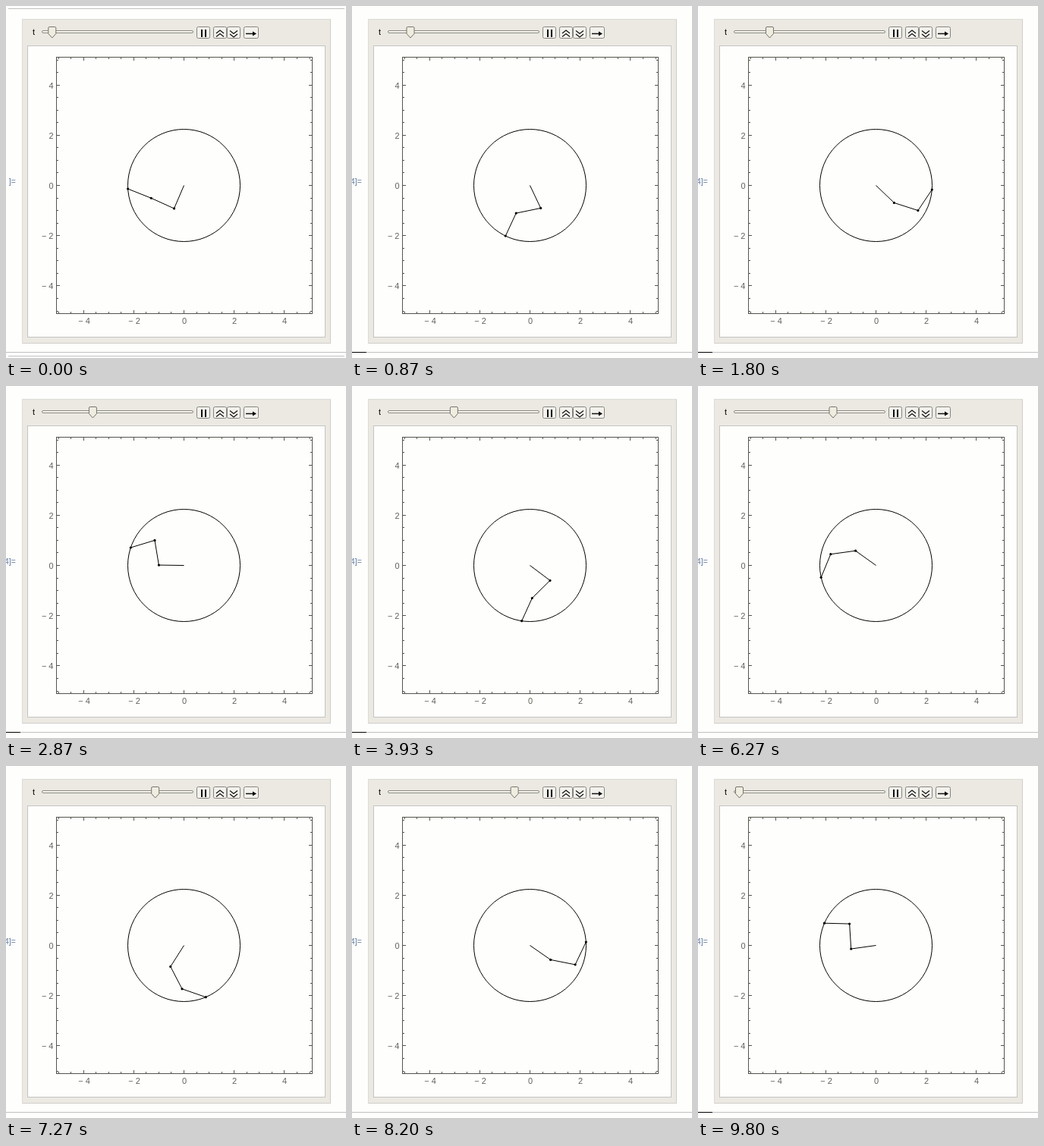
An HTML page that plays this animation: 448x464 px, repeating every 9870 ms.

```html
<!DOCTYPE html>
<html lang="en">
<head>
<meta charset="utf-8">
<title>Three-link arm on a circle</title>
<style>
html, body { margin: 0; width: 100%; height: 100%; overflow: hidden; background: #fefefc; }
svg { display: block; width: 448px; height: 464px; }
text { font: 11px "Liberation Sans", Arial, sans-serif; fill: #62625a; }
.line { fill: none; stroke: #000; stroke-width: 1; }
.axis { fill: none; stroke: #55554e; }
.rule { fill: none; stroke: #c0c0c0; }
.button { fill: #f3f1ec; stroke: #858580; }
.icon { fill: none; stroke: #111; stroke-width: 1.3; }
</style>
</head>
<body>
<svg viewBox="0 0 448 464">
  <path id="edges" class="rule" d="M3 3.5H446M3 461.5H446"/>
  <path class="rule" d="M0 456.5H448"/>
  <path id="caret" d="M0 456.5H19" stroke="#000"/>
  <text id="label" x="-2" y="235" style="font-size:10.5px;fill:#6079a0">4]=</text>

  <rect x="21.5" y="17.5" width="406" height="427" fill="#ece9e3" stroke="#dddbd6"/>
  <path d="M22 444.5H427.5V18" fill="none" stroke="#d0cecb"/>
  <rect x="28.5" y="52.5" width="392" height="384" fill="#fefefc" stroke="#c4c4c2"/>

  <text x="35" y="38" style="fill:#000">t</text>
  <rect x="47.5" y="32.5" width="199" height="3" rx="1.5" fill="#f4f2ea" stroke="#8a8a84"/>
  <path id="thumb" d="M-5 -5.5Q-5 -7-3.5 -7H3.5Q5 -7 5 -5.5V2L0 7.5L-5 2Z" fill="#efece0" stroke="#74746c"/>
  <g class="button">
    <rect x="251.5" y="27.5" width="17" height="15" rx="2"/>
    <rect x="273.5" y="27.5" width="17" height="15" rx="2"/>
    <rect x="291.5" y="27.5" width="17" height="15" rx="2"/>
    <rect x="313.5" y="27.5" width="19" height="15" rx="2"/>
  </g>
  <path class="icon" d="M277 36l5-4 5 4M277 40.5l5-4 5 4M295 32.5l5 4 5-4M295 37l5 4 5-4M316 36.5H328"/>
  <path d="M258 31V41M263 31V41" stroke="#111" stroke-width="2"/>
  <path d="M325 33.5L330 36.5L325 39.5Z"/>

  <rect class="axis" x="66.5" y="67.5" width="337" height="338"/>
  <path id="ticks" class="axis"/>
  <g id="numbers"></g>
  <circle class="line" cx="234.5" cy="236.5" r="74"/>
  <path id="arm" class="line" stroke-linejoin="round"/>
  <g id="joints"><circle r="1.6"/><circle r="1.6"/><circle r="1.6"/></g>
</svg>
<script>
const $ = id => document.getElementById(id);
const LOOP = 9870, TICK = 1000 / 15, UNIT = 33.1, CX = 234.5, CY = 236.5;
const RADIUS = Math.sqrt(5), REACH = 63.435, RAD = Math.PI / 180;

// [ms, angle of the tip, fold phase of the arm], in degrees
const keys = [
  [-370, 156.7, 60.5], [0, 183.5, 1.8], [1800, 355.7, 128.5], [2070, 407, 122],
  [3930, 621.3, 14.2], [5070, 698.8, 40], [6270, 912.8, 139.3],
  [8200, 1083.5, 127.2], [9800, 1236.7, 60.5], [10170, 1263.5, 1.8]
];

function slope(i, c) {
  const a = keys[i - 1], b = keys[i], d = keys[i + 1];
  const h = b[0] - a[0], k = d[0] - b[0];
  return ((b[c] - a[c]) / h * k + (d[c] - b[c]) / k * h) / (h + k);
}

// Hermite curve through the keys
function curve(t, c) {
  let i = 1;
  while (i < keys.length - 3 && t >= keys[i + 1][0]) i++;
  const a = keys[i], b = keys[i + 1], h = b[0] - a[0], s = (t - a[0]) / h, r = 1 - s;
  return a[c] * (1 + 2 * s) * r * r + b[c] * (3 - 2 * s) * s * s
    + h * s * r * (slope(i, c) * r - slope(i + 1, c) * s);
}

function armPoints(t) {
  const tip = curve(t, 1) * RAD, fold = curve(t, 2) * RAD;
  const first = tip + REACH * RAD * Math.cos(fold);
  const a = [Math.cos(first), Math.sin(first)];
  const e = [RADIUS * Math.cos(tip), RADIUS * Math.sin(tip)];
  const dx = e[0] - a[0], dy = e[1] - a[1], d2 = dx * dx + dy * dy;
  const bend = Math.sign(Math.sin(fold)) * Math.sqrt(Math.max(0, 1 / d2 - 0.25));
  const m = [a[0] + dx / 2 + dy * bend, a[1] + dy / 2 - dx * bend];
  return [a, m, e].map(([x, y]) => [CX + UNIT * x, CY - UNIT * y]);
}

function drawAxes() {
  let d = "", numbers = "";
  for (let i = -10; i <= 10; i++) {
    const x = Math.round(235 + i * UNIT / 2) - 0.5, y = Math.round(237 - i * UNIT / 2) - 0.5;
    const size = i % 4 ? 3 : 5;
    d += `M${x} 67v${size}M${x} 406v${-size}M66 ${y}h${size}M404 ${y}h${-size}`;
    if (i % 4 === 0) {
      const n = i < 0 ? "− " + -i / 2 : i / 2;
      numbers += `<text x="${x + 0.5}" y="419" text-anchor="middle">${n}</text>`
        + `<text x="62.5" y="${y + 4}" text-anchor="end">${n}</text>`;
    }
  }
  $("ticks").setAttribute("d", d);
  $("numbers").innerHTML = numbers;
}

function caretOn(t) {
  const ms = t % 1000;
  return t > 130 && (ms > 600 || ms < 130) && !(t > 8100 && t < 9100);
}

const joints = [...$("joints").children];
const show = (id, on) => $(id).setAttribute("visibility", on ? "visible" : "hidden");

function draw(now) {
  const time = now % LOOP, n = Math.floor((time + 3.4) / TICK);
  const t = n < 2 ? 0 : n * TICK;
  const points = armPoints(t);
  $("arm").setAttribute("d", `M${CX} ${CY}L` + points.map(p => p.join(" ")).join("L"));
  joints.forEach((dot, i) => {
    dot.setAttribute("cx", points[i][0]);
    dot.setAttribute("cy", points[i][1]);
  });
  const x = n >= 147 ? 54.5 : 60.8 + 0.0187 * t;
  $("thumb").setAttribute("transform", `translate(${x} 34.5)`);
  show("edges", t === 0);
  show("caret", caretOn(t));
  $("label").textContent = t === 0 ? "\u00a0 ]=" : "4]=";
  requestAnimationFrame(draw);
}

drawAxes();
draw(performance.now());
</script>
</body>
</html>
```
